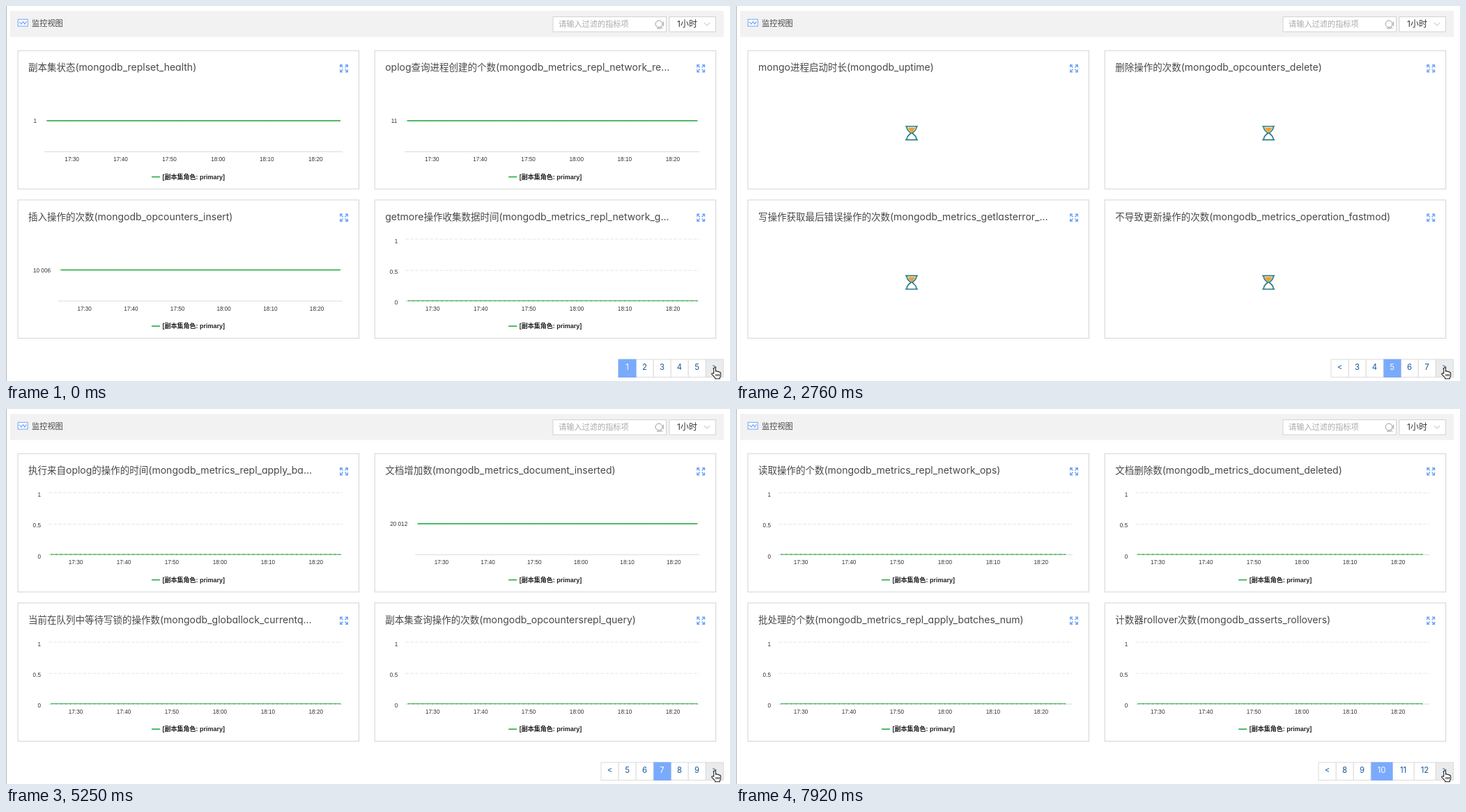
Animation, 1039 px wide and 539 px high, one loop 8 s. Source, as an HTML page:

```html
<!DOCTYPE html>
<html lang="zh-CN">
<head>
<meta charset="utf-8">
<title>监控视图</title>
<style>
html, body { margin: 0; width: 100%; height: 100%; overflow: hidden; background: #fff; }
svg { display: block; width: 1039px; height: 539px; }
text { font-family: Inter, "Noto Sans CJK SC", "Noto Sans CJK", sans-serif; fill: #484848; }
.title { font-size: 14px; font-feature-settings: "cv11"; }
.han { font-size: 13.5px; }
.head { font-size: 11.2px; fill: #444; }
.pick { font-size: 12px; fill: #333; }
.hint { fill: #aaa; }
.axis, .legend { font-family: "Liberation Sans", "Noto Sans CJK SC", "Noto Sans CJK", sans-serif; fill: #333; }
.axis { font-size: 8.2px; }
.legend { font-size: 9px; font-weight: bold; fill: #222; }
.mid { text-anchor: middle; }
.end { text-anchor: end; }
.box { fill: #fff; stroke: #d3d3d3; }
.grid { stroke: #e6e6e6; stroke-width: 1; stroke-dasharray: 5 2; }
.base { stroke: #dcdcdc; stroke-width: 1; }
.data { stroke: #36b34f; stroke-width: 1.8; fill: none; }
.thin { stroke-width: 1; }
.dots { stroke-width: 1.8; stroke-dasharray: 1.4 5.5; }
.icon { fill: none; stroke: #6ea4f7; stroke-width: 1.4; }
.glass { fill: none; stroke: #2b7c86; stroke-width: 1.7; }
.sand { fill: #eda12f; }
.page { font-size: 11.3px; fill: #17599c; text-anchor: middle; }
.on { fill: #fff; }
</style>
</head>
<body>
<svg viewBox="0 0 1039 539" xmlns="http://www.w3.org/2000/svg">
  <defs>
    <g id="expand" class="icon">
      <path id="arrow" d="M483.6 88.6L480 85M479.7 88.2V84.7H483.2"/>
      <use href="#arrow" transform="matrix(-1 0 0 1 970 0)"/>
      <use href="#arrow" transform="matrix(1 0 0 -1 0 179.4)"/>
      <use href="#arrow" transform="matrix(-1 0 0 -1 970 179.4)"/>
    </g>
  </defs>
  <path d="M.5 0V539" stroke="#b5b5b5"/>
  <rect x="6" y="7" width="1024" height="37.5" fill="#f2f2f2"/>
  <rect x="17.2" y="19.2" width="14" height="9.8" fill="#fff" stroke="#6ea4f7"/>
  <path d="M18.500 23.500h1.500l2 2.500 2.500-3.500 2.500 3.500 1.500-3h1.500" class="icon" style="stroke-width:1.2"/>
  <text class="head" x="37" y="29">监控视图</text>
  <rect class="box" x="785" y="15.5" width="162.5" height="21.5"/>
  <text class="head hint" x="793" y="30">请输入过滤的指标项</text>
  <g fill="none" stroke="#999">
    <circle cx="937" cy="25.8" r="4.9"/>
    <path d="M940 30l2.2 2.3M934 32.2h6.5M943.3 22.5v6.5"/>
  </g>
  <rect class="box" x="952" y="15.5" width="66.5" height="21.5"/>
  <text class="pick" x="963" y="30">1小时</text>
  <path d="M1002 24l4 4 4-4" fill="none" stroke="#bbb"/>
  <g id="panels"></g>
  <g id="pager"></g>
  <path d="M1015.7 528.6V521.2q0-1.5 1.4-1.5t1.4 1.5V525q1.7-.9 2.4.5 1.8-.6 2.3.7 2.4-.4 2.4 1.8v3q0 2-1.3 3.2v1.5h-6.6v-1.3l-4.6-4.7q-.9-1.2.2-1.8t2.4.7zM1019 529v3M1021.2 529v3M1023.4 529v3" fill="#fff" stroke="#222" stroke-width="1.1"/>
</svg>
<script>
const LOOP = 8000, DRAW = 500, STEP = 30;
const LEAD = [49, 31, 0, 48];   // how much earlier each panel finishes than the last one
const CLOCK = ['17:30', '17:40', '17:50', '18:00', '18:10', '18:20'];
const uptime = { ticks: ['92k', '90k', '88k', '86k'], from: 192.5, to: 139.3 };

// Chart kinds: 0 = all zero, string = constant value, object = rising line
const pages = [
  { start: -2000, end: -1000, charts: [
    ['副本集状态(mongodb_replset_health)', '1'],
    ['oplog查询进程创建的个数(mongodb_metrics_repl_network_re…', '11'],
    ['插入操作的次数(mongodb_opcounters_insert)', '10 006'],
    ['getmore操作收集数据时间(mongodb_metrics_repl_network_g…', 0]] },
  { start: 180, end: 1005, charts: [
    ['oplog缓存中的操作数(mongodb_metrics_repl_buffer_count)', 0],
    ['执行获取最后错误操作的时间(mongodb_metrics_getlasterror_w…', 0],
    ['getmore操作的个数(mongodb_metrics_repl_network_getmor…', 0],
    ['未使用的可用连接数(mongodb_connections_available)', '79 992']] },
  { start: 1050, end: 1890, charts: [
    ['文档更新数(mongodb_metrics_document_updated)', 0],
    ['当前连接数(mongodb_connections_current)', '8'],
    ['更新操作的次数(mongodb_opcounters_update)', 0],
    ['常规断言的次数(mongodb_asserts_regular)', 0]] },
  { start: 1980, end: 2700, charts: [
    ['数据库映射的内存总数(mongodb_mem_mapped)', 0],
    ['从服务器同步源读取的数据总量(mongodb_metrics_repl_networ…', 0],
    ['文档在磁盘上移动的次数(mongodb_metrics_record_moves)', 0],
    ['查询操作的次数(mongodb_opcounters_query)', '20']] },
  { start: 2760, end: 3480, charts: [
    ['mongo进程启动时长(mongodb_uptime)', uptime],
    ['删除操作的次数(mongodb_opcounters_delete)', 0],
    ['写操作获取最后错误操作的次数(mongodb_metrics_getlasterror_…', 0],
    ['不导致更新操作的次数(mongodb_metrics_operation_fastmod)', 0]] },
  { start: 3540, end: 4230, charts: [
    ['使用的物理内存(mongodb_mem_resident)', '64'],
    ['副本集插入操作的次数(mongodb_opcountersrepl_insert)', '6'],
    ['副本集更新操作的次数(mongodb_opcountersrepl_update)', 0],
    ['副本集删除操作的次数(mongodb_opcountersrepl_delete)', 0]] },
  { start: 4440, end: 5250, charts: [
    ['执行来自oplog的操作的时间(mongodb_metrics_repl_apply_ba…', 0],
    ['文档增加数(mongodb_metrics_document_inserted)', '20 012'],
    ['当前在队列中等待写锁的操作数(mongodb_globallock_currentq…', 0],
    ['副本集查询操作的次数(mongodb_opcountersrepl_query)', 0]] },
  { start: 5310, end: 6030, charts: [
    ['用户断言的次数(mongodb_asserts_user)', 0],
    ['警告的次数(mongodb_asserts_warning)', 0],
    ['消息断言的次数(mongodb_asserts_msg)', 0],
    ['需要排序的操作数(mongodb_metrics_operation_scanandorder)', 0]] },
  { start: 6270, end: 7050, charts: [
    ['命令的总数(mongodb_opcountersrepl_command)', 0],
    ['缓存的最大值(mongodb_metrics_repl_buffer_maxsizebytes)', '268 435 456'],
    ['文档被请求返回数(mongodb_metrics_document_returned)', 0],
    ['有ttl索引删除的文档数(mongodb_metrics_ttl_deleteddocumen…', 0]] },
  { start: 7260, end: 7920, shift: -7, charts: [
    ['读取操作的个数(mongodb_metrics_repl_network_ops)', 0],
    ['文档删除数(mongodb_metrics_document_deleted)', 0],
    ['批处理的个数(mongodb_metrics_repl_apply_batches_num)', 0],
    ['计数器rollover次数(mongodb_asserts_rollovers)', 0]] }
];

const RIGHT = 483, BASE = 209.5;
const text = (cls, x, y, s) => `<text class="${cls}" x="${x}" y="${y}">${s}</text>`;
const hline = (cls, x1, x2, y) => `<path class="${cls}" d="M${x1} ${y}H${x2}"/>`;
const titleMarkup = s => s.replace(/[\u4e00-\u9fff]+/g, m => `<tspan class="han">${m}</tspan>`);

function plotLeft(kind) {
  if (kind === 0) return 61;
  if (typeof kind === 'object') return 64;
  const spaces = kind.split(' ').length - 1;
  return Math.round(51 + (kind.length - spaces) * 4.4 + spaces * 2.3);
}

function chartMarkup(kind, shift, clip) {
  const left = plotLeft(kind), width = RIGHT - left;
  const x1 = left + 3.5, x2 = 480 + shift;
  const label = (s, y) => text('axis end', left - 11, y, s);
  let out = '', data;
  if (kind === 0) {
    out += hline('grid', left, RIGHT, 120.5) + hline('grid', left, RIGHT, 165.5);
    out += label('1', 126.2) + label('0.5', 170.3) + label('0', 214.8);
    data = hline('data thin', x1, x2, 209) + hline('data dots', x1, x2, 209.1);
  } else if (typeof kind === 'object') {
    kind.ticks.forEach((s, i) => {
      const y = 121 + i * 29.5;
      if (i < 3) out += hline('grid', left, RIGHT, y);
      out += label(s, y + 3.2);
    });
    data = `<path class="data" d="M${x1} ${kind.from}L${x2} ${kind.to}"/>`;
  } else {
    out += hline('grid', left, RIGHT, 165) + label(kind, 168);
    data = hline('data', x1, x2, 164.8);
  }
  out += hline('base', left, RIGHT, BASE);
  CLOCK.forEach((time, i) => {
    const x = left + width * (0.0925 + i * 0.1634) + shift;
    out += text('axis mid', x.toFixed(1), 223.4, time);
  });
  out += hline('data', 209, 221, 245.6) + text('legend', 224.5, 248.7, '[副本集角色: primary]');
  return `<clipPath id="${clip}"><rect x="${left}" y="100" width="0" height="115"/></clipPath>` +
    out + `<g clip-path="url(#${clip})">${data}</g>`;
}

const glassMarkup =
  '<path class="sand"/><path class="glass" d="M243 173H261M243 192.4H261' +
  'M245.2 173V175Q245.500 178.500 251.200 182.700Q245.500 187 245.200 190.500V192' +
  'M258.8 173V175Q258.500 178.500 252.800 182.700Q258.500 187 258.800 190.500V192"/>';

function sandPath(k) {
  const top = 174.8 + 6.5 * k, half = 5.5 * (1 - k), pile = 6 * k;
  return `M${252 - half} ${top}H${252 + half}Q${252 + half * 0.8} 178.500 252 182` +
    `Q${252 - half * 0.8} 178.500 ${252 - half} ${top}Z` +
    `M247 191.5H257L252 ${191.5 - pile}Z`;
}

function pagerMarkup(n) {
  const first = Math.max(1, n - (n > 4 ? 2 : n));
  let x = 1004, out = '';
  const cell = (w, s, fill, on) => {
    const line = on ? fill : '#dcdcdc';
    out += `<rect x="${x}" y="508" width="${w}" height="25.5" fill="${fill}" stroke="${line}"/>` +
      text(on ? 'page on' : 'page', x + w / 2, 523.2, s);
  };
  cell(25.5, '&gt;', '#ebebeb');
  for (let i = first + 4; i >= first; i--) {
    const w = i > 9 ? 31 : 25;
    x -= w;
    cell(w, i, i === n ? '#7aaafb' : '#fff', i === n);
  }
  if (n > 1) { x -= 25; cell(25, '&lt;', '#fff'); }
  return out;
}

const panelBox = document.getElementById('panels');
const pagerBox = document.getElementById('pager');
let shown = -1, parts = [];

function showPage(n) {
  const page = pages[n];
  panelBox.innerHTML = page.charts.map(([title, kind], i) =>
    `<g transform="translate(${i % 2 * 512.2} ${i > 1 ? 214.6 : 0})">` +
    '<rect class="box" x="17" y="64.2" width="489.5" height="198.8"/>' +
    text('title', 32, 93, titleMarkup(title)) + '<use href="#expand"/>' +
    `<g class="wait">${glassMarkup}</g>` +
    `<g class="chart">${chartMarkup(kind, page.shift || 0, 'clip' + i)}</g></g>`).join('');
  pagerBox.innerHTML = pagerMarkup(n + 1);
  parts = [...panelBox.children].map((g, i) => ({
    wait: g.querySelector('.wait'),
    sand: g.querySelector('.sand'),
    chart: g.querySelector('.chart'),
    clip: g.querySelector('clipPath rect'),
    width: RIGHT - plotLeft(page.charts[i][1])
  }));
  shown = n;
}

function render(t) {
  let n = pages.length - 1;
  while (pages[n].start > t) n--;
  if (n !== shown) showPage(n);
  const { start, end } = pages[n];
  parts.forEach((p, i) => {
    const begin = end - LEAD[i] - DRAW;
    const loading = t < begin;
    p.wait.style.display = loading ? '' : 'none';
    p.chart.style.display = loading ? 'none' : '';
    if (loading) {
      p.sand.setAttribute('d', sandPath((t - start) / 400 % 1));
    } else {
      const k = Math.min(1, (t - begin) / DRAW);
      p.clip.setAttribute('width', p.width * (1 - Math.cos(Math.PI * k)) / 2);
    }
  });
}

const origin = performance.now();
function tick() {
  const t = (performance.now() - origin) % LOOP;
  render(t - t % STEP);
  requestAnimationFrame(tick);
}
tick();
</script>
</body>
</html>
```
